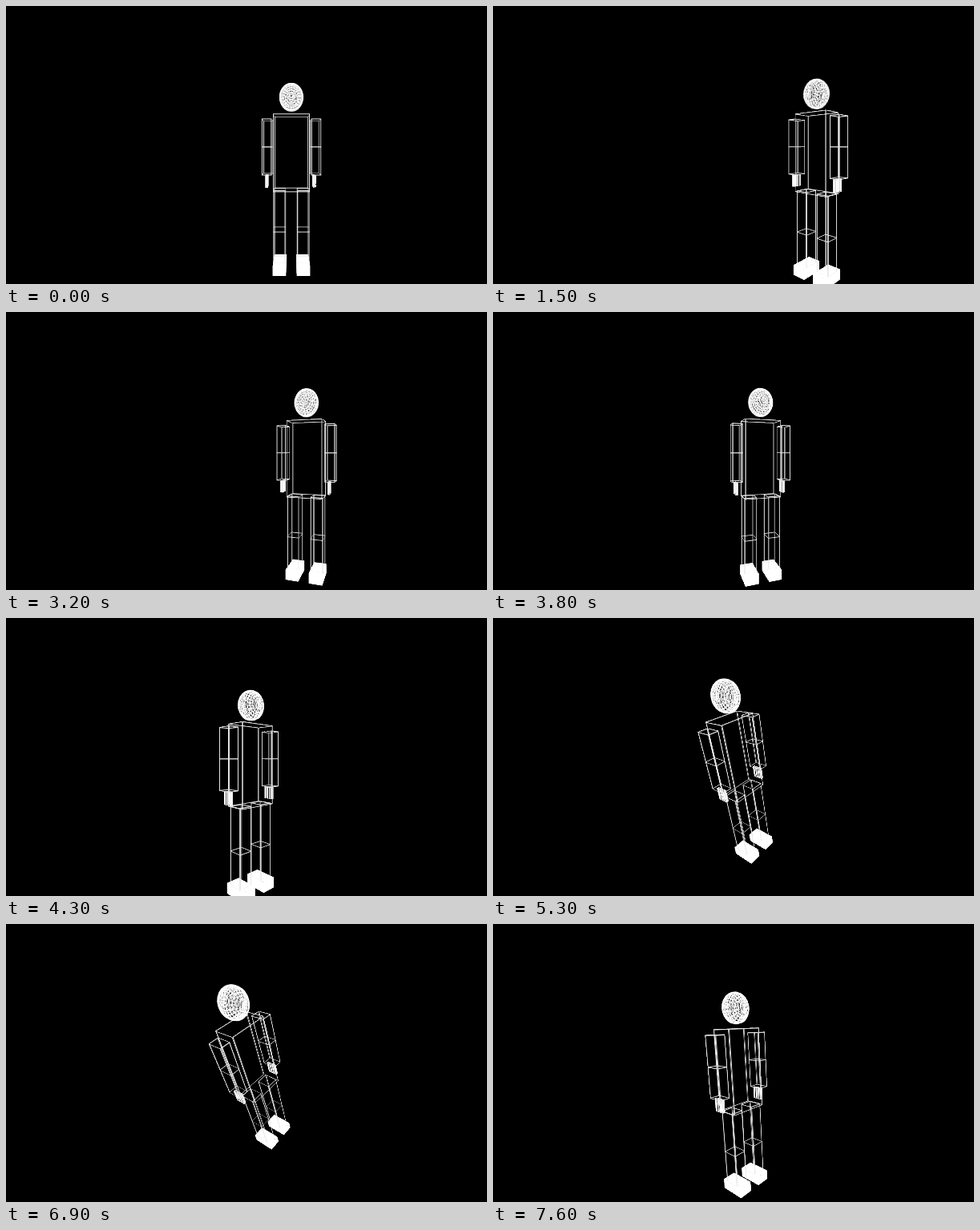
An HTML page without scripts that plays this animation: 600 px wide and 347 px high, repeating every 8000 ms.

```html
<!DOCTYPE html>
<html lang="en">
<head>
<meta charset="utf-8">
<title>Wireframe figure</title>
<style>
html, body { margin: 0; width: 100%; height: 100%; overflow: hidden; background: #000; }
body { position: relative; color: #fff; perspective: 300px; perspective-origin: 356px 176px; }
div, i, b, u { position: absolute; transform-style: preserve-3d; }

/* The figure stands 63px behind the pivot it circles around. */
.tilt { left: 356px; top: 176px; animation: tilt 8s step-start infinite; }
.turn { animation: turn 8s step-start infinite; }
.figure { transform: translateZ(-63px); }

/* A box is two pairs of parallel faces; solid parts add a third pair as caps. */
.box { transform: translate(var(--x, 0), var(--y)); color: #e8e8e8; }
.box i:nth-child(1) { --a: var(--w); --b: var(--h); --c: var(--d); }
.box i:nth-child(2) { --a: var(--d); --b: var(--h); --c: var(--w); transform: rotateY(90deg); }
.box i:nth-child(3) { --a: var(--w); --b: var(--d); --c: var(--h); transform: rotateX(90deg); }
.box i::before, .box i::after {
  content: ""; position: absolute; box-sizing: border-box;
  width: var(--a); height: var(--b); border: 1px solid;
  transform: translate(-50%, -50%) translateZ(calc(var(--c) / 2));
}
.box i::after { transform: translate(-50%, -50%) translateZ(calc(var(--c) / -2)); }

.torso { --w: 44px; --h: 94px; --d: 26px; --y: 7px; }
.arm { --w: 12px; --h: 35px; --d: 18px; --x: 30px; --y: -17px; }
.fore { --y: 17px; }
.hand { --w: 3px; --h: 15px; --d: 13px; --x: 28px; --y: 42px; }
.thigh { --w: 15px; --h: 51px; --d: 18px; --x: 14.5px; --y: 78px; }
.shin { --w: 15px; --h: 39px; --d: 18px; --x: 14.5px; --y: 122px; }
.foot { --w: 16px; --h: 12px; --d: 30px; --x: 14.3px; --y: 146.6px; }
.left.arm { --x: -30px; }
.left.hand { --x: -30.5px; }
.left.thigh, .left.shin { --x: -14.5px; }
.left.foot { --x: -14.3px; }

/* Elbows and knees share one line with the part above. */
.fore i::before, .fore i::after, .shin i::before, .shin i::after { border-top: 0; }

.foot i::before, .foot i::after { background: #fff; border-color: #fff; }
.hand i:nth-child(1)::before, .hand i:nth-child(1)::after { background: #fff; }
.hand i:nth-child(2)::before, .hand i:nth-child(2)::after {
  border-width: 1px 0 0;
  background: repeating-linear-gradient(90deg, #fff 0 2px, #0000 2px 3.25px);
}

/* Sphere with its poles at front and back. */
.head { transform: translateY(-62px) scaleY(1.17); }
.head b, .head u {
  --r: 30px; width: var(--r); height: var(--r);
  box-sizing: border-box; border: 1px solid; border-radius: 50%;
}
.head b {
  --t: calc(var(--i) * 11.25deg); --r: calc(30px * sin(var(--t)));
  transform: translate(-50%, -50%) translateZ(calc(15px * cos(var(--t))));
}
.head u { transform: translate(-50%, -50%) rotateZ(calc(var(--i) * 18deg)) rotateY(90deg); }
.head::before, .head::after {
  content: ""; position: absolute; width: 24px; height: 24px; border-radius: 50%;
  background: repeating-conic-gradient(#fff 0 6deg, #0000 6deg 18deg);
  transform: translate(-50%, -50%) translateZ(9px);
}
.head::after { transform: translate(-50%, -50%) translateZ(-9px); }

@keyframes turn {
  0% { transform: rotateY(12deg); }
  5% { transform: rotateY(12deg); animation-timing-function: steps(2, start); }
  7.5% { transform: rotateY(9.5deg); }
  11.25% { transform: rotateY(9.5deg); animation-timing-function: steps(9, start); }
  22.5% { transform: rotateY(-45deg); animation-timing-function: steps(5, start); }
  28.75% { transform: rotateY(-55deg); }
  31.25% { transform: rotateY(-55deg); animation-timing-function: steps(9, start); }
  42.5% { transform: rotateY(1deg); animation-timing-function: steps(9, start); }
  53.75% { transform: rotateY(57.5deg); }
  57.5% { transform: rotateY(60deg); }
  62.5%, 100% { transform: rotateY(62deg); }
}
/* The tilt axis is turned 12deg away from the screen plane. */
@keyframes tilt {
  0% { transform: translate3d(0, 0, 63px) rotateY(-12deg) rotateX(0deg); }
  62.5% {
    transform: translate3d(0, 0, 63px) rotateY(-12deg) rotateX(0deg);
    animation-timing-function: steps(9, start);
  }
  73.75% { transform: translate3d(2px, 10px, 63px) rotateY(-12deg) rotateX(-61deg); }
  76.25% { transform: translate3d(2px, 10px, 63px) rotateY(-12deg) rotateX(-63deg); }
  82.5% {
    transform: translate3d(2px, 10px, 63px) rotateY(-12deg) rotateX(-64deg);
    animation-timing-function: steps(9, start);
  }
  93.75% {
    transform: translate3d(3px, 3px, 63px) rotateY(-12deg) rotateX(-10deg);
    animation-timing-function: steps(2, start);
  }
  96.25%, 100% { transform: translate3d(3px, 3px, 63px) rotateY(-12deg) rotateX(-9.6deg); }
}
</style>
</head>
<body>
<div class="tilt"><div class="turn"><div class="figure">
  <div class="head">
    <b style="--i:1"></b><b style="--i:2"></b><b style="--i:3"></b><b style="--i:4"></b><b style="--i:5"></b>
    <b style="--i:6"></b><b style="--i:7"></b><b style="--i:8"></b><b style="--i:9"></b><b style="--i:10"></b>
    <b style="--i:11"></b><b style="--i:12"></b><b style="--i:13"></b><b style="--i:14"></b><b style="--i:15"></b>
    <u style="--i:0"></u><u style="--i:1"></u><u style="--i:2"></u><u style="--i:3"></u><u style="--i:4"></u>
    <u style="--i:5"></u><u style="--i:6"></u><u style="--i:7"></u><u style="--i:8"></u><u style="--i:9"></u>
  </div>
  <div class="box torso"><i></i><i></i></div>
  <div class="box left arm"><i></i><i></i></div>
  <div class="box left arm fore"><i></i><i></i></div>
  <div class="box left hand"><i></i><i></i><i></i></div>
  <div class="box arm"><i></i><i></i></div>
  <div class="box arm fore"><i></i><i></i></div>
  <div class="box hand"><i></i><i></i><i></i></div>
  <div class="box left thigh"><i></i><i></i></div>
  <div class="box left shin"><i></i><i></i></div>
  <div class="box left foot"><i></i><i></i><i></i></div>
  <div class="box thigh"><i></i><i></i></div>
  <div class="box shin"><i></i><i></i></div>
  <div class="box foot"><i></i><i></i><i></i></div>
</div></div></div>
</body>
</html>
```
